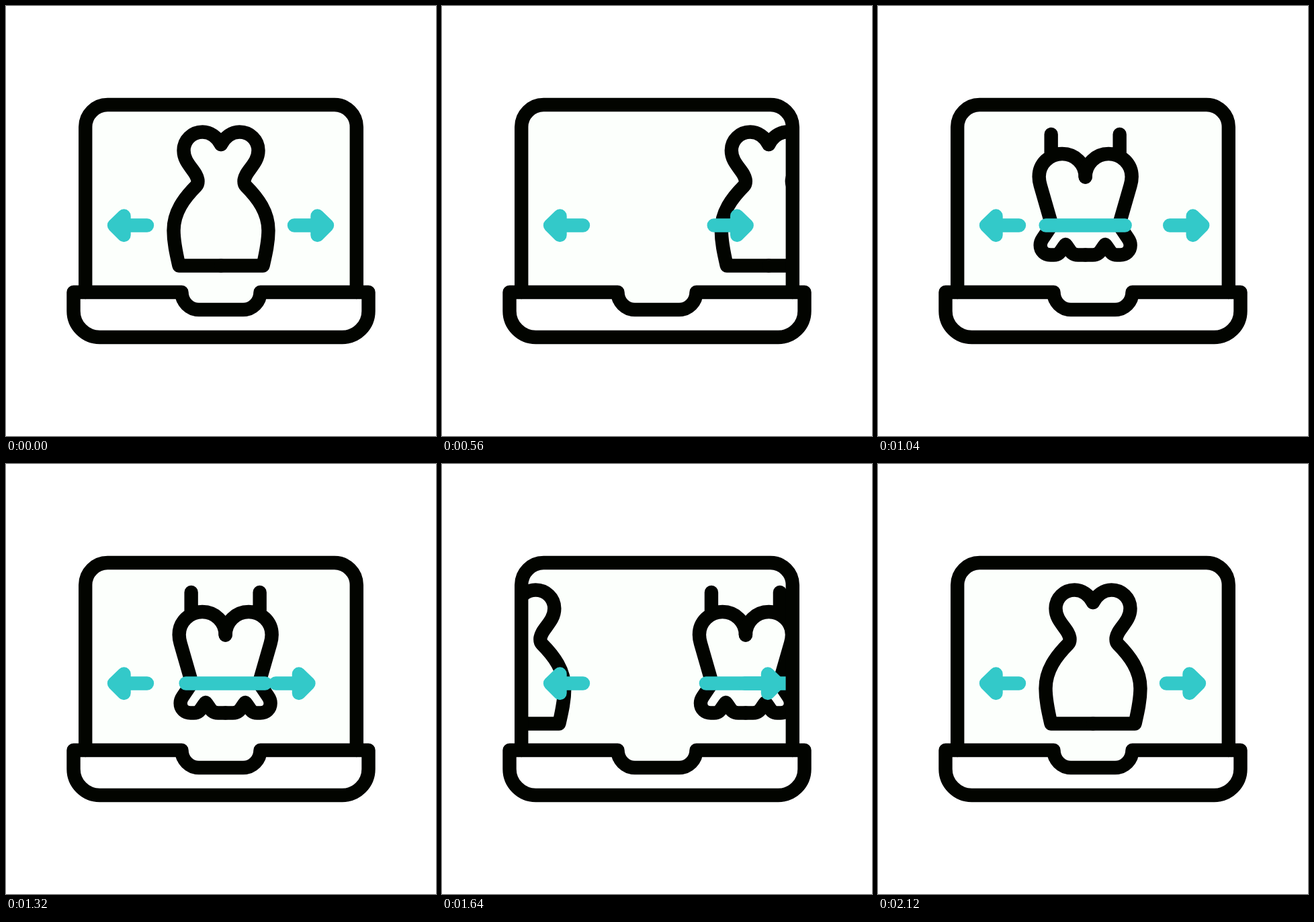
An HTML page that plays this animation: 640 by 640 pixels, repeating every 2.4 s.

```html
<!DOCTYPE html>
<html lang="en">
<head>
<meta charset="utf-8">
<title>Online dress shop</title>
<style>
  html, body { margin: 0; width: 100%; height: 100%; overflow: hidden; background: #fff; }
  svg { display: block; width: 100vw; height: 100vh; }
  .line { fill: none; stroke: #020400; stroke-width: 20.4; stroke-linecap: round; stroke-linejoin: round; }
  .teal { fill: #33c9c9; stroke: #33c9c9; }
</style>
</head>
<body>
<svg viewBox="0 0 640 640">
  <defs>
    <clipPath id="screen"><rect x="128" y="150" width="384" height="270"/></clipPath>
    <path id="sheathHalf" d="M0 206C-6 195-16 187.500-27.500 187.500C-43 187.500-55.500 199.500-55.500 215
      C-55.500 236-34.500 246-34.500 261C-34.500 264-35.500 266.500-37 268C-55 286-70.500 307-70.500 334
      C-70.500 352-66.500 369-62.500 386.500H0"/>
    <path id="frillHalf" d="M-51 191V218M0 254.500C0 235-15.500 220-34.500 220C-53.500 220-69 235-69 254
      Q-69 260-67 267L-50 326L-63.500 346Q-67 351-67 356C-67 365-60 370.500-52 370.500H-47
      C-37 370.500-36 362-29.500 355C-23 362-22 370.500-11 370.500H0"/>
    <path id="arrow" class="line teal" d="M161 326.500L175.500 312.500V341ZM175.500 326.500H210"/>
  </defs>

  <path fill="#fcfffc" d="M118 426V180a33 33 0 0 1 33-33H489a33 33 0 0 1 33 33V426H379L353 452H287L261 426Z"/>
  <g clip-path="url(#screen)">
    <g id="sheath" class="line">
      <use href="#sheathHalf"/><use href="#sheathHalf" transform="scale(-1 1)"/>
    </g>
    <g id="frill" class="line">
      <use href="#frillHalf"/><use href="#frillHalf" transform="scale(-1 1)"/>
      <path class="teal" d="M-59 326.500H59"/>
    </g>
    <use href="#arrow"/>
    <use id="pointer" href="#arrow"/>
  </g>
  <g class="line">
    <path d="M118.200 426V180a33 33 0 0 1 33-33H488.800a33 33 0 0 1 33 33V426"/>
    <path d="M100.500 426H261.500A25.500 26 0 0 0 287 452H353A25.500 26 0 0 0 378.500 426H539.500V454
      a39 39 0 0 1-39 39H139.500a39 39 0 0 1-39-39Z"/>
  </g>
</svg>
<script>
  const LOOP = 2400, CENTER = 320;
  const $ = id => document.getElementById(id);
  const arrowKeys = [[0, 0], [500, -28], [870, 23], [1300, -28], [1680, 23], [2120, 0], [LOOP, 0]];

  const curve = ms => (Math.max(0, ms) / 320) ** 2.45;
  const leave = (t, start) => 56 * curve(t - start);
  const enter = (t, end) => -77.5 * curve(end - t);

  function arrowShift(t) {
    const i = arrowKeys.findIndex(key => t < key[0]);
    const [t0, a] = arrowKeys[i - 1], [t1, b] = arrowKeys[i];
    const u = (t - t0) / (t1 - t0);
    return a + (b - a) * u * u * (3 - 2 * u);
  }

  function place(id, x, extra = "") {
    $(id).setAttribute("transform", `translate(${x.toFixed(2)} 0)${extra}`);
  }

  function draw() {
    const t = performance.now() % LOOP;
    place("sheath", CENTER + (t < 1100 ? leave(t, 62) : enter(t, 2120)));
    place("frill", CENTER + (t < 1187 ? enter(t, 1187) : leave(t, 1187)));
    place("pointer", 639 + arrowShift(t), " scale(-1 1)");
    requestAnimationFrame(draw);
  }
  draw();
</script>
</body>
</html>
```
